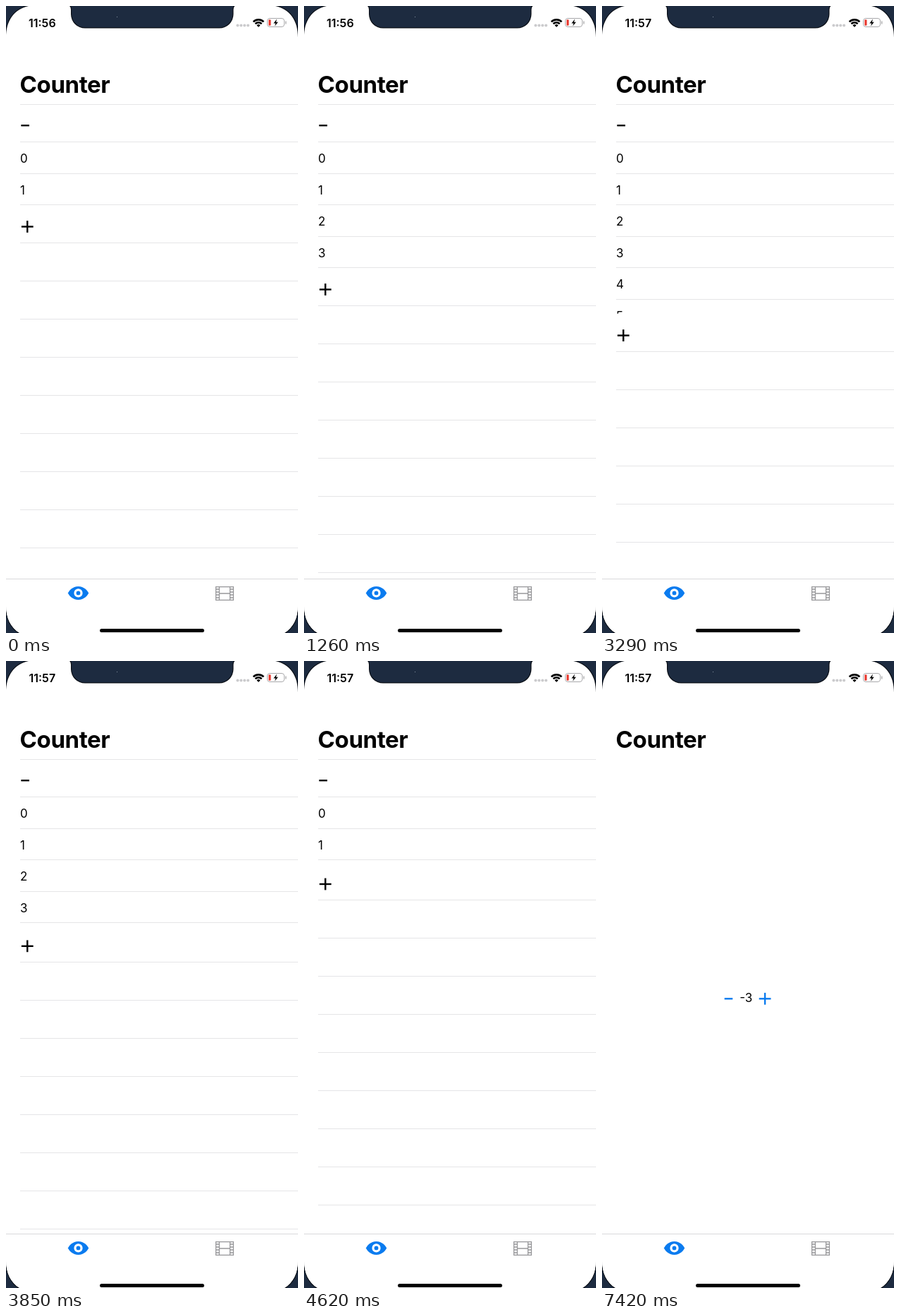
Animation, 414 px wide and 888 px high, one loop 7980 ms. Source, as an HTML page with a canvas:

```html
<!DOCTYPE html>
<html lang="en">
<head>
<meta charset="utf-8">
<title>Counter</title>
<style>
  html, body { margin: 0; width: 100%; height: 100%; overflow: hidden; background: #1d2b40; }
  canvas { display: block; width: 414px; height: 888px; }
</style>
</head>
<body>
<canvas id="stage" width="414" height="888"></canvas>
<script>
const ctx = document.getElementById('stage').getContext('2d');
const W = 414, H = 888, LOOP = 7980, STEP = 70;
const FONT = 'Inter, Roboto, sans-serif';
const BLUE = '#0a7bef', LINE = '#e5e5e7', GRAY = '#98989b';
const LIST_TOP = 192.5, ROW = 44.5, BUTTON_ROW = 54, TAB_TOP = 811;
const CLOCK_CHANGE = 2100, VIEW_CHANGE = 4760;

// [start of row motion, rows added]
const taps = [[300, 1], [930, 1], [1390, 1], [1933, 1],
              [3200, -1], [3615, -1], [3980, -1], [4410, -1]];
// [press time, length of the fade]
const presses = [[6160, 210], [6650, 210], [7070, 350]];

const clamp = x => Math.max(0, Math.min(1, x));

// Critically damped spring, settled once the rest is below a pixel
function spring(ms) {
  if (ms <= 0) return 0;
  const k = ms * 0.02, rest = (1 + k) * Math.exp(-k);
  return rest < 0.022 ? 1 : 1 - rest;
}

function flash(ms, lead) {
  return ms < -lead ? 0 : clamp((90 - ms) / 60);
}

function rect(x, y, w, h, color) {
  ctx.fillStyle = color;
  ctx.fillRect(x, y, w, h);
}

function disc(x, y, r, color) {
  ctx.fillStyle = color;
  ctx.beginPath();
  ctx.arc(x, y, r, 0, 7);
  ctx.fill();
}

function text(str, x, y, size, weight = 400, align = 'left', spacing = 0) {
  ctx.font = `${weight} ${size}px ${FONT}`;
  ctx.textAlign = align;
  ctx.letterSpacing = spacing + 'px';
  ctx.fillStyle = '#000';
  ctx.fillText(str, x, y);
}

function minus(x, y, color) {
  rect(x - 5.8, y - 1.2, 11.6, 2.4, color);
}

function plus(x, y, color) {
  rect(x - 8.4, y - 1.2, 16.8, 2.4, color);
  rect(x - 1.2, y - 8.4, 2.4, 16.8, color);
}

function separator(y) {
  rect(20, Math.floor(y), W - 20, 1, LINE);
}

function highlight(y, h, alpha) {
  if (alpha > 0) rect(0, Math.round(y), W, h, `rgba(218,217,223,${alpha})`);
}

function drawList(t) {
  let rows = 2, plusFlash = 0, minusFlash = 0;
  for (const [start, dir] of taps) {
    const ms = t - start;
    rows += dir * spring(ms);
    if (dir > 0) plusFlash = Math.max(plusFlash, flash(ms, 25));
    else minusFlash = Math.max(minusFlash, flash(ms, 55));
  }

  separator(139);
  highlight(138.5, 54, minusFlash);
  minus(27.2, 169.2, '#000');
  separator(LIST_TOP);

  const shown = Math.ceil(rows - 1e-6), full = Math.floor(rows + 1e-6);
  const top = LIST_TOP + ROW * rows;
  for (let i = 0; i < shown; i++) text(i, 20, LIST_TOP + ROW * i + 29.8, 17);

  // The button row slides over the row that opens or closes
  rect(0, top, W, BUTTON_ROW, '#fff');
  for (let i = 1; i <= full; i++) separator(LIST_TOP + ROW * i);
  for (let y = top + BUTTON_ROW; y < TAB_TOP; y += BUTTON_ROW) separator(y);
  highlight(top, BUTTON_ROW, plusFlash);
  plus(30.3, top + 31, '#000');
}

function drawStepper(t) {
  let value = 0, alpha = 1;
  for (const [start, length] of presses) {
    const ms = t - start;
    if (ms >= STEP) value--;
    if (ms >= 0 && ms < length) {
      alpha = ms < STEP ? 0.4 : 0.25 + 0.75 * (ms - STEP) / (length - STEP);
    }
  }
  const mid = 204.3;
  text(value, mid, 482.6, 17, 400, 'center');
  const half = ctx.measureText(value).width / 2;
  ctx.globalAlpha = alpha;
  minus(mid - half - 15.8, 478.3, BLUE);
  ctx.globalAlpha = 1;
  plus(mid + half + 17.7, 478.3, BLUE);
}

function drawStatus(t) {
  text(t < CLOCK_CHANGE ? '11:56' : '11:57', 51.3, 29.6, 16, 600, 'center');

  for (let i = 0; i < 4; i++) disc(328.4 + i * 4.9, 27.5, 2, '#cbcbcd');

  ctx.strokeStyle = '#000';
  ctx.lineWidth = 2.6;
  for (const r of [10.4, 6.4]) {
    ctx.beginPath();
    ctx.arc(358, 29.8, r, -Math.PI * 0.75, -Math.PI * 0.25);
    ctx.stroke();
  }
  ctx.fillStyle = '#000';
  ctx.beginPath();
  ctx.moveTo(358, 30);
  ctx.arc(358, 29.8, 3.6, -Math.PI * 0.75, -Math.PI * 0.25);
  ctx.fill();

  ctx.strokeStyle = '#a9a9ab';
  ctx.lineWidth = 1;
  ctx.beginPath();
  ctx.roundRect(370.5, 17.5, 24, 12, 3.5);
  ctx.stroke();
  rect(396, 21.5, 1.4, 4, '#a9a9ab');
  ctx.fillStyle = '#e8392f';
  ctx.beginPath();
  ctx.roundRect(372.3, 19.3, 3.2, 8.4, 1.2);
  ctx.fill();
  ctx.fillStyle = '#000';
  ctx.beginPath();
  for (const [x, y] of [[384, 18.6], [379.3, 24.4], [382.2, 24.4], [381, 28.6], [385.8, 22.7], [382.9, 22.7]]) {
    ctx.lineTo(x, y);
  }
  ctx.fill();
}

function drawEye(x, y) {
  ctx.fillStyle = BLUE;
  ctx.beginPath();
  ctx.moveTo(x - 14.6, y);
  ctx.bezierCurveTo(x - 13.5, y - 3.2, x - 8, y - 9.5, x, y - 9.5);
  ctx.bezierCurveTo(x + 8, y - 9.5, x + 13.5, y - 3.2, x + 14.6, y);
  ctx.bezierCurveTo(x + 13.5, y + 3.2, x + 8, y + 9.5, x, y + 9.5);
  ctx.bezierCurveTo(x - 8, y + 9.5, x - 13.5, y + 3.2, x - 14.6, y);
  ctx.fill();
  disc(x, y, 6.1, '#fff');
  disc(x, y, 2.9, BLUE);
}

function drawFilm(x, y) {
  ctx.strokeStyle = GRAY;
  ctx.lineWidth = 1.3;
  ctx.strokeRect(x + 0.6, y + 0.6, 24.8, 18.8);
  ctx.beginPath();
  for (const dx of [5.4, 20.6]) {
    ctx.moveTo(x + dx, y);
    ctx.lineTo(x + dx, y + 20);
  }
  ctx.moveTo(x + 5.4, y + 10);
  ctx.lineTo(x + 20.6, y + 10);
  for (let i = 1; i < 5; i++) {
    for (const dx of [0.6, 20.6]) {
      ctx.moveTo(x + dx, y + i * 4);
      ctx.lineTo(x + dx + 4.8, y + i * 4);
    }
  }
  ctx.stroke();
}

function drawTabs() {
  rect(0, TAB_TOP, W, H - TAB_TOP, '#fff');
  rect(0, TAB_TOP, W, 1, '#d8d8da');
  drawEye(102.5, 831.4);
  drawFilm(297, 822);
  ctx.fillStyle = '#000';
  ctx.beginPath();
  ctx.roundRect(133, 882, 148, 5, 2.5);
  ctx.fill();
}

// Rounded display outline with the notch cut out
function screenPath() {
  const top = -1.5, bottom = 894.5, r = 46, c = 17;
  const p = new Path2D();
  p.moveTo(0, top + r);
  p.bezierCurveTo(0, top + c, c, top, r, top);
  p.lineTo(85, top);
  p.quadraticCurveTo(92, top, 92, 5);
  p.lineTo(92, 11);
  p.arcTo(92, 31.5, 112, 31.5, 20);
  p.lineTo(302, 31.5);
  p.arcTo(322.5, 31.5, 322.5, 11, 20);
  p.lineTo(322.5, 5);
  p.quadraticCurveTo(322.5, top, 329.5, top);
  p.lineTo(W - r, top);
  p.bezierCurveTo(W - c, top, W, top + c, W, top + r);
  p.lineTo(W, bottom - r);
  p.bezierCurveTo(W, bottom - c, W - c, bottom, W - r, bottom);
  p.lineTo(r, bottom);
  p.bezierCurveTo(c, bottom, 0, bottom - c, 0, bottom - r);
  p.closePath();
  return p;
}
const screen = screenPath();

function draw(t) {
  rect(0, 0, W, H, '#1d2b40');
  rect(157, 15, 1, 1, '#8793a3');
  ctx.strokeStyle = '#0a0e15';
  ctx.lineWidth = 2.4;
  ctx.stroke(screen);
  ctx.save();
  ctx.clip(screen);
  rect(0, 0, W, H, '#fff');
  text('Counter', 19.6, 123, 33, 700, 'left', -0.4);
  if (t < VIEW_CHANGE) drawList(t);
  else drawStepper(t);
  drawStatus(t);
  drawTabs();
  ctx.restore();
}

const origin = performance.now();
function tick() {
  const t = (performance.now() - origin) % LOOP;
  draw(Math.floor(t / STEP) * STEP);
  requestAnimationFrame(tick);
}
tick();
</script>
</body>
</html>
```
